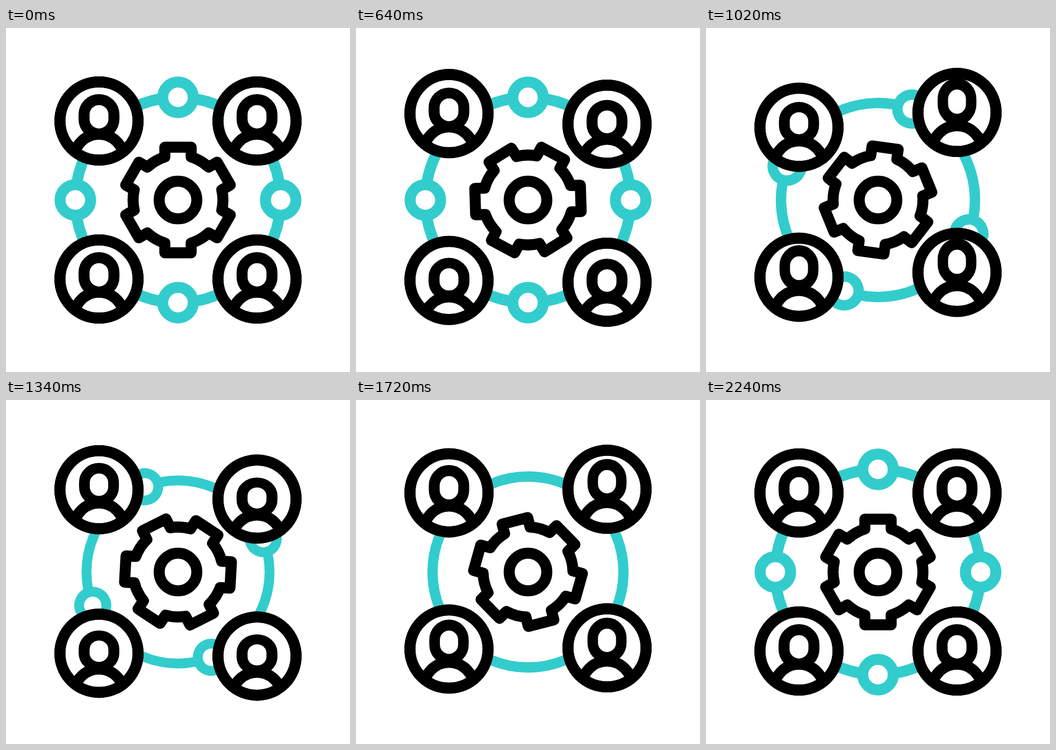
These frames come from a looping animation (640x640 px, 2.4 s). An HTML page:

```html
<!DOCTYPE html>
<html lang="en">
<head>
<meta charset="utf-8">
<title>Connected team</title>
<style>
  html, body { margin: 0; width: 100%; height: 100%; overflow: hidden; background: #fff; }
  svg { display: block; width: 100%; height: 100%; }
  .ink, .teal { stroke: #000; stroke-width: 20.5; stroke-linejoin: round; fill: none; }
  .teal { stroke: #3cc; }
  .solid { fill: #fff; }
</style>
</head>
<body>
<svg viewBox="0 0 640 640">
  <defs>
    <clipPath id="disc"><circle r="74"/></clipPath>
    <circle id="node" r="28.4"/>
  </defs>
  <g id="ring" class="teal">
    <circle r="191"/>
    <g class="solid">
      <use href="#node" y="-191"/>
      <use href="#node" x="191"/>
      <use href="#node" y="191"/>
      <use href="#node" x="-191"/>
    </g>
  </g>
  <g class="ink">
    <path id="gear"/>
    <circle cx="320" cy="320" r="35"/>
  </g>
  <g id="team" class="ink"></g>
</svg>
<script>
const LOOP = 2400;
const $ = id => document.getElementById(id);

// Keys are [time, value] pairs, joined by sine in-out easing.
function track(keys, t) {
  if (t <= keys[0][0]) return keys[0][1];
  for (let i = 1; i < keys.length; i++) {
    const [t0, a] = keys[i - 1], [t1, b] = keys[i];
    if (t < t1) return a + (b - a) * (1 - Math.cos(Math.PI * (t - t0) / (t1 - t0))) / 2;
  }
  return keys[keys.length - 1][1];
}

// Smooth curve through the keys, at rest at both ends.
function spline(keys, t) {
  const last = keys.length - 1;
  if (t >= keys[last][0]) return keys[last][1];
  const slope = i => i === 0 || i === last ? 0
    : (keys[i + 1][1] - keys[i - 1][1]) / (keys[i + 1][0] - keys[i - 1][0]);
  const i = keys.findIndex(k => k[0] > t) - 1;
  const [t0, a] = keys[i], [t1, b] = keys[i + 1];
  const d = t1 - t0, u = (t - t0) / d, v = 1 - u;
  return v * v * (1 + 2 * u) * a + u * u * (3 - 2 * u) * b
    + d * u * v * (v * slope(i) - u * slope(i + 1));
}

const ringTurn = [[680, 0], [2240, 180]];
const ringScale = [[640, 1], [1400, .89], [2180, 1]];
const gearTurn = [[0, 0], [320, 35], [640, 88], [1020, 187.5], [1340, 273], [1720, 345.5], [2000, 360]];

// Avatar tracks, relative to each avatar's own start
const bob = [[0, 0], [180, 6], [450, -22], [785, 14], [1130, -9], [1470, 0]];
const nod = [[40, 0], [250, 8], [530, -14], [850, 10], [1210, -6.5], [1540, 0]];
const headW = [[300, 1], [560, .947], [850, 1], [1230, .954], [1540, 1]];
const headH = [[40, 1], [250, .95], [530, 1.04], [850, .9], [1210, 1], [1540, 1]];
const shrug = [[60, 0], [240, 6], [360, 0], [680, 0], [900, 5.5], [1060, 0]];

const team = [
  { x: 173, y: 173, start: 290 },
  { x: 467, y: 173, start: 480 },
  { x: 173, y: 467, start: 400 },
  { x: 467, y: 467, start: 455 }
];

$('team').innerHTML = team.map(() => `
  <g>
    <circle class="solid" r="72.7"/>
    <g clip-path="url(#disc)">
      <circle class="body" r="46.7"/>
      <rect class="head" x="-27.8" y="10.2" width="55.6" height="64" rx="27.8"/>
    </g>
    <circle r="72.7"/>
  </g>`).join('');
team.forEach((m, i) => {
  m.el = $('team').children[i];
  m.head = m.el.querySelector('.head');
  m.body = m.el.querySelector('.body');
});

function gearPath(rim, tip, half) {
  const base = -Math.sqrt(rim * rim - half * half);
  const corners = [[-half, base], [-half, -tip], [half, -tip], [half, base]];
  let d = '';
  for (let k = 0; k < 6; k++) {
    const c = Math.cos(k * Math.PI / 3), s = Math.sin(k * Math.PI / 3);
    corners.forEach(([x, y], j) => {
      const p = `${(x * c - y * s).toFixed(2)} ${(x * s + y * c).toFixed(2)}`;
      d += j ? `L${p}` : k ? `A${rim} ${rim} 0 0 1 ${p}` : `M${p}`;
    });
  }
  return `${d}A${rim} ${rim} 0 0 1 ${-half} ${base.toFixed(2)}Z`;
}
$('gear').setAttribute('d', gearPath(83.6, 98.2, 24.5));

const move = (el, value) => el.setAttribute('transform', value);

function draw(t) {
  move($('ring'), `translate(320 320) rotate(${track(ringTurn, t)}) scale(${track(ringScale, t)})`);
  move($('gear'), `translate(320 320) rotate(${spline(gearTurn, t)})`);
  for (const m of team) {
    const s = t - m.start;
    move(m.el, `translate(${m.x} ${m.y + track(bob, s)})`);
    move(m.head, `translate(0 ${track(nod, s) - 50}) scale(${track(headW, s)} ${track(headH, s)})`);
    move(m.body, `translate(0 ${71.3 + track(shrug, s)})`);
  }
}

function tick() {
  draw(performance.now() % LOOP);
  requestAnimationFrame(tick);
}
tick();
</script>
</body>
</html>
```
